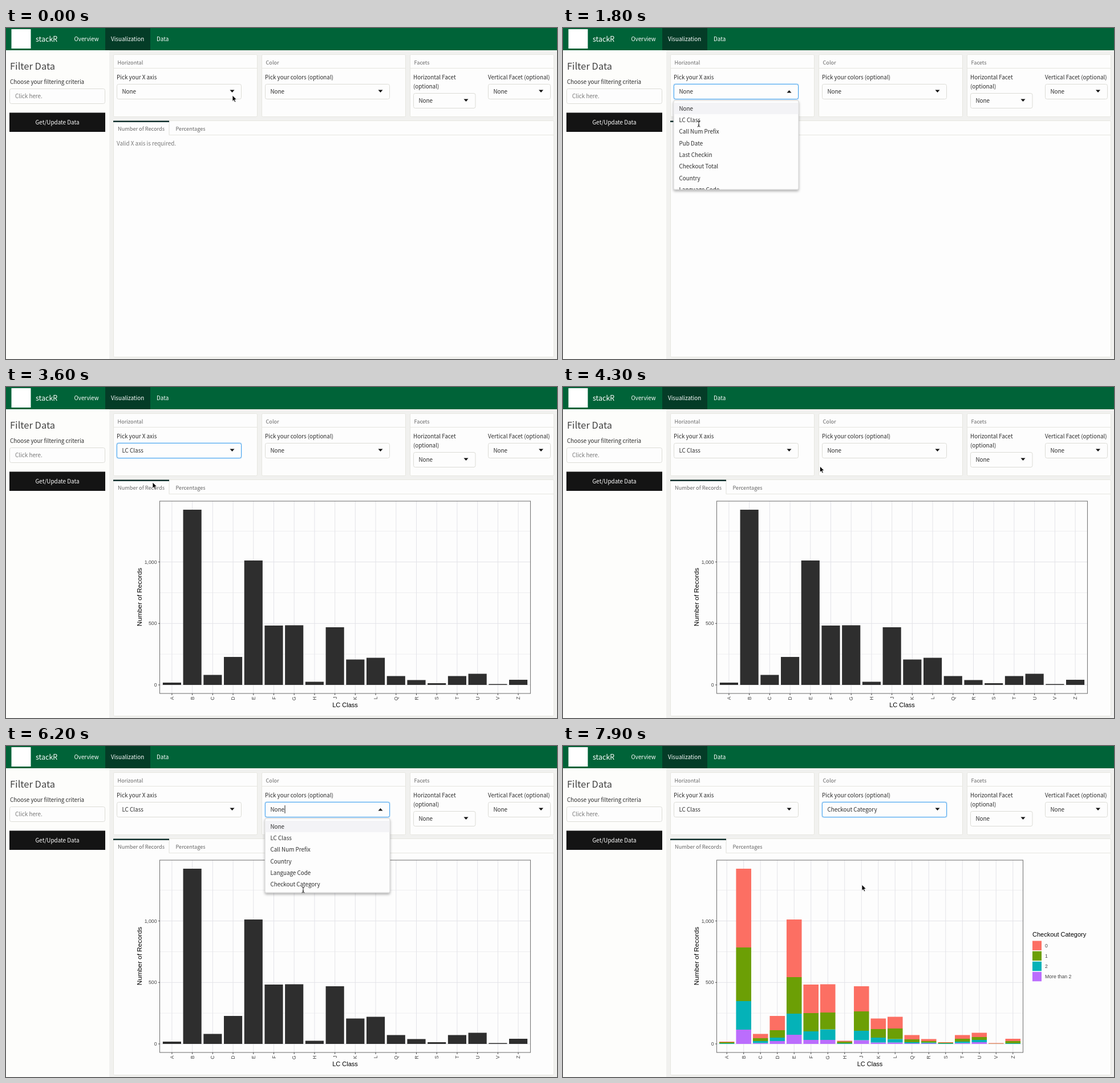
Animation of 966 by 580 pixels, one loop 8000 ms. Source, as an HTML page:

```html
<!DOCTYPE html>
<html lang="en">
<head>
<meta charset="utf-8">
<title>Stack dashboard</title>
<style>
html, body { margin: 0; width: 100%; height: 100%; overflow: hidden; background: #fefefe; }
svg { display: block; width: 966px; height: 580px; }
text { font: 9.85px "Noto Sans CJK JP", "Noto Sans CJK SC", "Noto Sans CJK", "Noto Sans", sans-serif; fill: #2c2c2c; }
.nav { fill: #fff; }
.brand { font-size: 12.5px; fill: #fff; }
.h1 { font-size: 16.5px; font-weight: 300; fill: #444; }
.small { font-size: 9.2px; fill: #666; }
.muted { fill: #777; }
.plot text { font: 8.7px "Liberation Sans", Arial, sans-serif; fill: #444; }
.plot .title { font-size: 11px; fill: #000; }
.plot .side { font-size: 11.8px; }
</style>
</head>
<body>
<svg id="stage" viewBox="0 0 966 580"></svg>
<script>
const LOOP = 8000;
const OPEN_X = 900, PICK_X = 2200, PLOT = 2700, BLUR = 4200;
const OPEN_COLOR = 5200, PICK_COLOR = 6600, COLORED = 7400;

const rect = (x, y, w, h, fill, more = '') =>
  `<rect x="${x}" y="${y}" width="${w}" height="${h}" fill="${fill}" ${more}/>`;
const text = (x, y, s, cls = '', more = '') => `<text x="${x}" y="${y}" class="${cls}" ${more}>${s}</text>`;
const line = (x1, y1, x2, y2, stroke, w = 1) =>
  `<path d="M${x1} ${y1}L${x2} ${y2}" stroke="${stroke}" stroke-width="${w}"/>`;
const group = (id, s, more = '') => `<g id="${id}" ${more}>${s}</g>`;
const box = (x, y, w, h, stroke = '#dcdcd6', r = 3) =>
  rect(x + .5, y + .5, w - 1, h - 1, '#fdfdfd', `rx="${r}" stroke="${stroke}"`);
const triangle = (x, y, up) => `<path d="M${x - 4} ${y + (up ? 2.5 : -2.5)}h8l-4 ${up ? -4.5 : 4.5}z" fill="#111"/>`;

function card(x, title) {
  return box(x, 46, 253, 110, '#e6e6e0', 2) + line(x, 70.5, x + 253, 70.5, '#e6e6e0') +
    text(x + 7.5, 64, title, 'small');
}

function select(x, y, w, id) {
  return box(x, y, w, 27) + (id ? group(id + 'Focus',
    rect(x, y, w, 27, 'none', 'rx="3" stroke="#a8d6fa" stroke-width="2" opacity=".5"') +
    rect(x + .5, y + .5, w - 1, 26, 'none', 'rx="3" stroke="#4ba6f0"')) : '') +
    text(x + 9.5, y + 17, 'None', '', id ? `id="${id}Value"` : '') +
    (id ? group(id + 'Up', triangle(x + 202.5, y + 13, true)) + group(id + 'Down', triangle(x + 202.5, y + 13))
        : triangle(x + w - 17, y + 13));
}

function menu(id, x, h, items) {
  const rows = items.map((s, i) => text(x + 9.5, 144.5 + i * 20.35, s)).join('');
  return group(id, rect(x, 127, 219, h, '#fdfdfd', 'rx="2" stroke="#d0d0d0" filter="url(#shadow)"') +
    rect(x + .5, 131, 218, 20, '#f3f3f6') +
    `<svg x="${x}" y="127" width="219" height="${h}" viewBox="${x} 127 219 ${h}">${rows}</svg>` +
    rect(x + 34.5, 104, 1, 14, '#222', `id="${id}Caret"`));
}

// Bar heights in pixels: purple top, teal top, green top, full height
const bars = {
  A: [0, 1, 3, 4], B: [25, 75, 169, 307], C: [1.5, 5, 10, 17.5], D: [5, 11, 24, 49],
  E: [16, 53, 117, 218], F: [7, 22, 54, 104], G: [7, 25.5, 55, 104.5], H: [0, 1, 4, 5.5],
  J: [6.5, 23, 57, 101], K: [2.5, 11, 26, 44.5], L: [2.5, 8.5, 27, 47.5], Q: [1, 3, 8, 15.5],
  R: [1, 2.5, 5, 8.5], S: [0, 1, 2, 3], T: [1.5, 4, 9, 15.5], U: [3, 7, 12, 19.5],
  V: [0, 0, .5, 1.5], Z: [0, 1, 5, 9]
};
const hues = ['#bb6dfd', '#04b2b8', '#6c9f05', '#fc6f63'];
const BASE = 522, LEFT = 269.5;

function plot(id, right, stacked) {
  const step = (right - LEFT) / 18.2, mid = (LEFT + right) / 2;
  let grid = '', marks = '', axes = '';
  for (let v = 0; v <= 1250; v += 250) {
    const y = BASE - v * .2154, major = v % 500 === 0;
    grid += line(LEFT, y, right, y, '#e3e3e8', major ? 1 : .6);
    if (major) axes += line(267, y, LEFT, y, '#444') +
      text(264.5, y + 3, v.toLocaleString('en-US'), '', 'text-anchor="end"');
  }
  Object.entries(bars).forEach(([name, tops], i) => {
    const x = LEFT + step * (i + .6), w = step * .9;
    grid += line(x, 200, x, 537, '#e3e3e8');
    axes += line(x, 537, x, 540, '#444') +
      text(0, 0, name, '', `text-anchor="end" transform="translate(${x + 3} 542.5) rotate(-90)"`);
    const parts = stacked ? tops : [tops[3]];
    parts.forEach((top, k) => {
      const low = k ? parts[k - 1] : 0;
      marks += rect(x - w / 2, BASE - top, w, top - low, stacked ? hues[k] : '#2e2e2e');
    });
  });
  let legend = '';
  if (stacked) {
    legend = text(823, 334, 'Checkout Category', 'title');
    ['0', '1', '2', 'More than 2'].forEach((s, i) => {
      const y = 341.5 + i * 18.1;
      legend += rect(823, y, 16, 16.5, hues[3 - i]) + text(845, y + 11.5, s);
    });
  }
  return group(id, grid + marks + rect(LEFT, 200, right - LEFT, 337, 'none', 'stroke="#777" stroke-width="1.1"') +
    axes + legend + text(mid, 561, 'LC Class', 'title', 'text-anchor="middle"') +
    text(0, 0, 'Number of Records', 'title side', 'text-anchor="middle" transform="translate(238 368) rotate(-90)"'),
    'class="plot"');
}

const stage = document.getElementById('stage');
stage.innerHTML =
  `<defs><filter id="shadow" x="-10%" y="-10%" width="120%" height="120%">
    <feDropShadow dx="0" dy="2.5" stdDeviation="2.2" flood-opacity=".32"/></filter></defs>` +
  rect(0, 0, 966, 580, '#fdfdfb') + rect(181, 39, 785, 541, '#f1f1ef') +
  // Navigation bar
  rect(0, 0, 966, 39, '#006338') + rect(174, 0, 79, 39, '#043c27') + rect(9.5, 2, 34, 34, '#fff') +
  text(52, 24, 'stackR', 'brand') + text(119.5, 23, 'Overview', 'nav') +
  text(184, 23, 'Visualization', 'nav') + text(264, 23, 'Data', 'nav') +
  // Sidebar
  text(7, 73, 'Filter Data', 'h1') + text(7, 98, 'Choose your filtering criteria') +
  box(6, 106, 168, 27) + text(16, 123, 'Click here.', 'muted') +
  rect(6, 148.4, 168, 33.6, '#141414') + text(90, 169, 'Get/Update Data', 'nav', 'text-anchor="middle"') +
  // Controls
  card(188, 'Horizontal') + card(448, 'Color') + card(708, 'Facets') +
  text(194, 90, 'Pick your X axis') + select(194, 98, 219, 'x') +
  text(454, 90, 'Pick your colors (optional)') + select(454, 98, 219, 'color') +
  text(714, 90, 'Horizontal Facet') + text(714, 106, '(optional)') + select(714, 114, 109.5) +
  text(845, 90, 'Vertical Facet (optional)') + select(845, 98, 110) +
  // Tabbed output
  box(188, 162, 773, 415, '#e6e6e0', 2) + line(286, 187.5, 961, 187.5, '#e6e6e0') +
  line(286, 163, 286, 187.5, '#e0e0da') + rect(188, 162.5, 98, 2.5, '#12312f') +
  text(196, 180, 'Number of Records', 'small') + text(297.5, 180, 'Percentages', 'small') +
  text(194, 206, 'Valid X axis is required.', 'muted', 'id="notice"') +
  plot('plain', 919.5, false) + plot('stacked', 806.5, true) +
  menu('xMenu', 194, 156, ['None', 'LC Class', 'Call Num Prefix', 'Pub Date', 'Last Checkin',
    'Checkout Total', 'Country', 'Language Code']) +
  menu('colorMenu', 454, 130, ['None', 'LC Class', 'Call Num Prefix', 'Country', 'Language Code',
    'Checkout Category']) +
  rect(961, 0, 5, 574, '#555', 'id="scrollbar" rx="2"') +
  group('arrow', '<path d="M0 0V10.5L2.4 8.3L4 12L5.8 11.2L4.2 7.6H7.5Z" fill="#000" stroke="#fff" stroke-width=".8"/>') +
  group('beam', '<path d="M-2.5 -5Q0 -5 0 -3.5Q0 -5 2.5 -5M0 -4V4M-2.5 5Q0 5 0 3.5Q0 5 2.5 5M-1.3 2H1.3" fill="none" stroke="#222"/>');

const el = id => document.getElementById(id);
const show = (id, on) => el(id).setAttribute('visibility', on ? 'visible' : 'hidden');
const between = (t, a, b) => t >= a && t < b;

const path = [
  [0, 397, 118], [1000, 397, 118], [1700, 238, 168], [1900, 238, 168], [2200, 234, 163],
  [2500, 234, 163], [3500, 257, 167], [3700, 257, 167], [4900, 643, 111], [5400, 643, 111],
  [6150, 521, 252], [6300, 521, 252], [6600, 524, 243], [LOOP, 524, 243]
];

function pointer(t) {
  const i = path.findIndex(p => p[0] > t);
  const [t0, x0, y0] = path[i - 1], [t1, x1, y1] = path[i];
  const u = (t - t0) / (t1 - t0), e = u * u * (3 - 2 * u);
  return `translate(${x0 + (x1 - x0) * e} ${y0 + (y1 - y0) * e})`;
}

function control(id, t, open, pick, blur, value) {
  const opened = between(t, open, pick);
  show(id + 'Focus', between(t, open, blur));
  show(id + 'Up', opened);
  show(id + 'Down', !opened);
  show(id + 'Menu', opened);
  show(id + 'MenuCaret', opened && (t - open) % 1000 < 500);
  el(id + 'Value').textContent = t < pick ? 'None' : value;
}

function draw(now) {
  const t = now % LOOP;
  control('x', t, OPEN_X, PICK_X, BLUR, 'LC Class');
  control('color', t, OPEN_COLOR, PICK_COLOR, LOOP, 'Checkout Category');
  show('notice', t < PLOT);
  show('plain', between(t, PLOT, COLORED));
  show('stacked', t >= COLORED);
  show('scrollbar', between(t, 2300, 2700) || between(t, 6800, 7300));
  const beam = between(t, 1100, PICK_X) || between(t, 4750, PICK_COLOR);
  show('beam', beam);
  show('arrow', !beam);
  el(beam ? 'beam' : 'arrow').setAttribute('transform', pointer(t));
  requestAnimationFrame(() => draw(performance.now()));
}
draw(performance.now());
</script>
</body>
</html>
```
